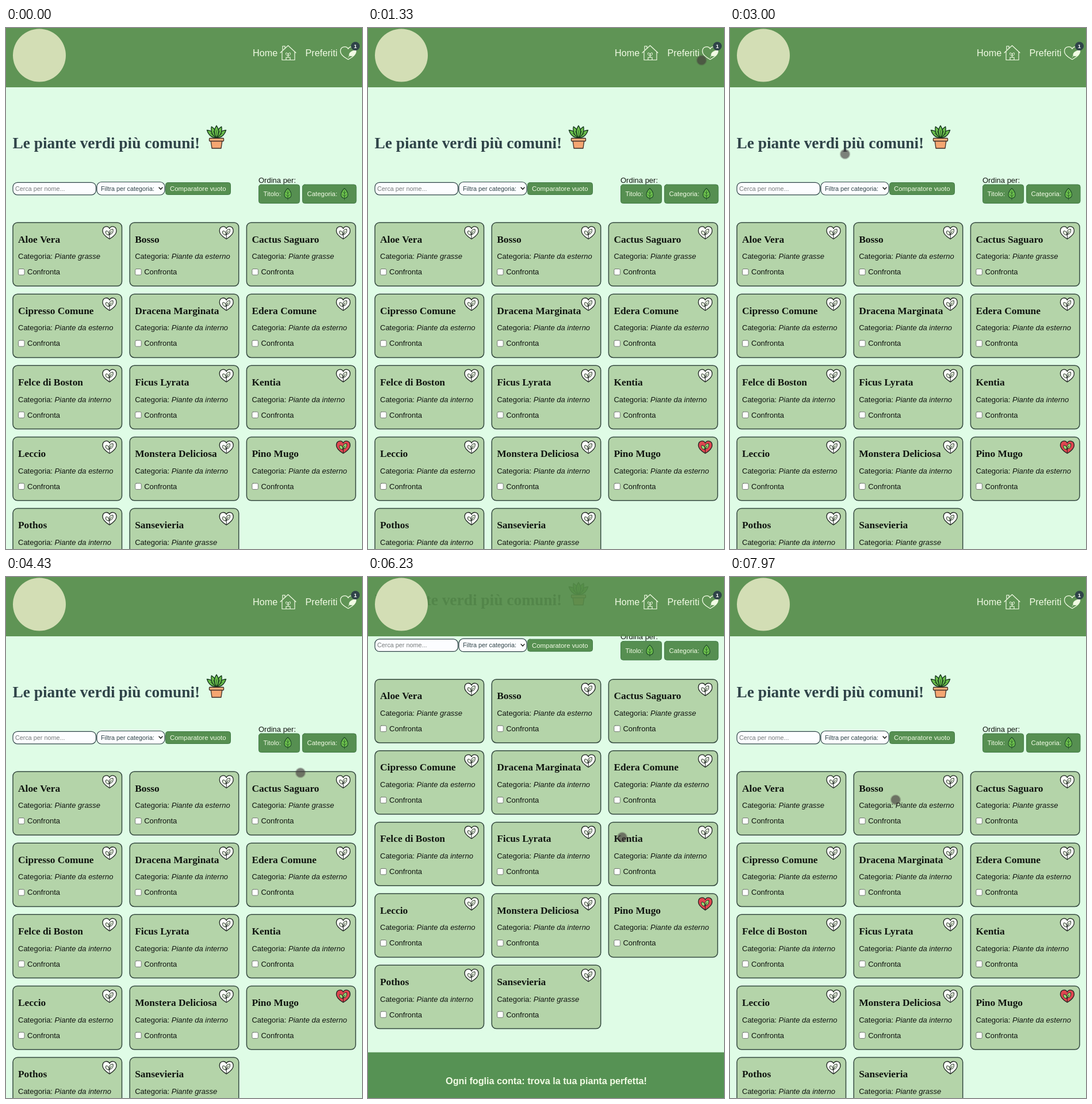
These frames come from a looping animation (619 px wide and 905 px high, 8 s). An HTML page with a canvas:

```html
<!DOCTYPE html>
<html lang="it">
<head>
<meta charset="utf-8">
<title>Le piante verdi più comuni!</title>
<style>
html, body { margin: 0; width: 100%; height: 100%; overflow: hidden; background: #dffce6; }
canvas { display: block; width: 619px; height: 905px; }
</style>
</head>
<body>
<canvas id="stage"></canvas>
<script>
const W = 619, H = 905, LOOP = 8000;
const canvas = document.getElementById('stage');
const ratio = window.devicePixelRatio || 1;
canvas.width = W * ratio;
canvas.height = H * ratio;
const ctx = canvas.getContext('2d');

const SANS = '"Liberation Sans", Arial, sans-serif';
const SERIF = '"Liberation Serif", "Noto Serif", serif';
const PAGE = '#dffce6', GREEN = '#568f51', CARD = '#b4d4a9';
const SLATE = '#2f4348', CREAM = '#f1fbe4', INK = '#101510', LEAF = '#6cc04c';

const OUT = 'Piante da esterno', IN = 'Piante da interno', FAT = 'Piante grasse';
const plants = [
  ['Aloe Vera', FAT], ['Bosso', OUT], ['Cactus Saguaro', FAT],
  ['Cipresso Comune', OUT], ['Dracena Marginata', IN], ['Edera Comune', OUT],
  ['Felce di Boston', IN], ['Ficus Lyrata', IN], ['Kentia', IN],
  ['Leccio', OUT], ['Monstera Deliciosa', IN], ['Pino Mugo', OUT, true],
  ['Pothos', IN], ['Sansevieria', FAT]
];

// Pointer keys: time, x, y
const pointerKeys = [
  [650, 636, -14], [1250, 580, 56], [1480, 580, 56], [3000, 200, 219],
  [4430, 512, 340], [5500, 442, 452], [7150, 442, 452], [7900, 288, 387]
];
const MAX_SCROLL = 178;

const clamp = v => Math.max(0, Math.min(1, v));
const easeOut = u => 1 - (1 - u) ** 3;
const easeInOut = u => u * u * (3 - 2 * u);

function text(str, x, y, size, color, style = '', family = SANS) {
  ctx.font = `${style} ${size}px ${family}`;
  ctx.fillStyle = color;
  ctx.fillText(str, x, y);
}

function box(x, y, w, h, r, fill, stroke, line = 1) {
  ctx.beginPath();
  ctx.roundRect(x, y, w, h, r);
  paint(fill, stroke, line);
}

function disc(x, y, r, fill) {
  ctx.beginPath();
  ctx.arc(x, y, r, 0, Math.PI * 2);
  paint(fill);
}

function paint(fill, stroke, line = 1) {
  if (fill) { ctx.fillStyle = fill; ctx.fill(); }
  if (stroke) { ctx.strokeStyle = stroke; ctx.lineWidth = line; ctx.stroke(); }
}

function path(d, fill, stroke, line) {
  const p = new Path2D(d);
  if (fill) { ctx.fillStyle = fill; ctx.fill(p); }
  if (stroke) { ctx.strokeStyle = stroke; ctx.lineWidth = line; ctx.stroke(p); }
}

function at(x, y, draw, angle = 0) {
  ctx.save();
  ctx.translate(x, y);
  ctx.rotate(angle);
  draw();
  ctx.restore();
}

const HEART = 'M0 11C-4 8.5-12 4-12-3C-12-12-2.5-12.5 0-7C2.5-12.5 12-12 12-3C12 4 4 8.5 0 11Z';

function favourite(x, y, on) {
  at(x, y, () => {
    path(HEART, on ? '#df4650' : '#fcfffa', '#1e2421', 1.3);
    const fill = on ? '#9bd873' : '#e3efdb';
    path('M-1 4C-8 4-7-2-6-3C-2-3 0 0-1 4Z', fill, '#1e2421', 1);
    path('M0 3C-2-4 2-6 6-6C7 0 4 3 0 3Z', fill, '#1e2421', 1);
    path('M0 10.5V3L3-2', null, '#1e2421', 1);
  });
}

function sortLeaf(x, y) {
  at(x, y, () => {
    path('M0 7.5C-8.5 6-7.5-3 0-10C7.5-3 8.5 6 0 7.5Z', LEAF, '#1d4a28', 1.1);
    path('M0 10V-6M0 4L-3.5 1M0 4L3.5 1M0-1L-2.5-3.5M0-1L2.5-3.5', null, '#1d4a28', 0.7);
  });
}

function pottedPlant() {
  const blade = 'M0 0C-4.5-6-5-14 0-21.5C5-14 4.5-6 0 0Z';
  at(366, 191, () => {
    for (const a of [-0.88, 0.88, -0.42, 0.42, 0]) {
      at(0, 0, () => {
        path(blade, LEAF, '#12331c', 1.3);
        path('M0-2V-13', null, '#12331c', 0.7);
      }, a);
    }
    path('M-10 4L-8 18H8L10 4Z', '#f5a672', '#3b2924', 1.3);
    box(-12.5, 0.5, 25, 5, 1, '#f9b27e', '#3b2924', 1.3);
  });
}

function control(x, y, w, h, label, tx, ty) {
  box(x, y, w, h, 4, GREEN, '#437b48', 1);
  text(label, tx, ty, 11.4, CREAM);
}

function toolbar() {
  box(12, 268.3, 144.5, 21.5, 8, '#fcfdff', SLATE, 1.2);
  text('Cerca per nome...', 16, 282.5, 10.8, '#777b7c');
  box(158, 267.5, 118, 22.5, 8, '#fcfdff', SLATE, 1.2);
  text('Filtra per categoria:', 165, 282.5, 10.8, SLATE);
  path('M266 277L269 280.3L272 277', null, INK, 1.4);
  control(277.5, 268.5, 113, 21, 'Comparatore vuoto', 285, 283);
  text('Ordina per:', 439, 268.5, 13, INK);
  control(439.5, 272, 71, 32.5, 'Titolo:', 447.5, 292);
  sortLeaf(490, 288.5);
  control(515.5, 272, 93.5, 32.5, 'Categoria:', 523.5, 292);
  sortLeaf(588.5, 288.5);
}

function card([name, category, liked], i) {
  at(12 + (i % 3) * 203.2, 338 + Math.floor(i / 3) * 124.15, () => {
    box(0, 0, 189.5, 110.3, 8, CARD, '#34493f', 1.5);
    text(name, 9, 34.5, 17.4, INK, 'bold', SERIF);
    text('Categoria: ', 9, 63.3, 13, INK);
    text(category, 72.6, 63.3, 13, INK, 'italic');
    box(9.5, 80.5, 10.5, 10.5, 2, '#fff', '#717a70', 1);
    text('Confronta', 25, 90.3, 13, INK);
    favourite(168, 17.5, liked);
  });
}

function page(scroll) {
  at(0, -scroll, () => {
    text('Le piante verdi più comuni!', 11.5, 209, 27.4, SLATE, 'bold', SERIF);
    pottedPlant();
    toolbar();
    plants.forEach(card);
    ctx.fillStyle = '#569254';
    ctx.fillRect(0, 986, W, 110);
    ctx.textAlign = 'center';
    text('Ogni foglia conta: trova la tua pianta perfetta!', 310, 1041.5, 16.2, CREAM, 'bold');
  });
}

function header() {
  ctx.fillStyle = 'rgba(85, 139, 73, .92)';
  ctx.fillRect(0, 0, W, 103);
  disc(58, 47.5, 46, '#d3deb5');
  text('Home', 429, 48.5, 16.2, CREAM);
  path('M477 43L490.5 30.5L504 43M480 41V55.5H502V41M481 38V31.5H485V35M487 55V51H494V55', null, CREAM, 1.2);
  path('M490.5 51V44M490.5 48C486 48 486 44 487 43C490 43 490.5 46 490.5 48C495 48 495 44 494 43C491 43 490.5 46 490.5 48', null, CREAM, 1);
  text('Preferiti', 520.5, 48.5, 16.2, CREAM);
  at(595, 43.5, () => {
    ctx.scale(1.13, 1.02);
    path(HEART, null, CREAM, 1.2);
  });
  path('M597 48C595.5 42 602 40 608 38C609 46 604 50.5 597 48ZM595 51L598 47', CREAM, CREAM, 0.8);
  disc(607.5, 31.5, 7.6, SLATE);
  ctx.textAlign = 'center';
  text('1', 607.5, 35, 9.5, '#fff', 'bold');
  ctx.textAlign = 'left';
}

function scrollAt(t) {
  const down = easeOut(clamp((t - 6000) / 430));
  const up = easeOut(clamp((t - 6630) / 430));
  return MAX_SCROLL * (down - up);
}

function pointer(t) {
  if (t < pointerKeys[0][0]) return;
  const next = pointerKeys.findIndex(k => k[0] > t);
  const b = pointerKeys[next < 0 ? pointerKeys.length - 1 : next];
  const a = next < 0 ? b : pointerKeys[next - 1];
  const u = a === b ? 0 : easeInOut((t - a[0]) / (b[0] - a[0]));
  const x = a[1] + (b[1] - a[1]) * u;
  const y = a[2] + (b[2] - a[2]) * u;
  disc(x, y, 9.3, 'rgba(70, 65, 65, .25)');
  disc(x, y, 7.8, 'rgba(64, 54, 55, .5)');
}

function draw(t) {
  ctx.setTransform(ratio, 0, 0, ratio, 0, 0);
  ctx.lineJoin = ctx.lineCap = 'round';
  ctx.fillStyle = PAGE;
  ctx.fillRect(0, 0, W, H);
  page(scrollAt(t));
  header();
  pointer(t);
}

const start = performance.now();
function tick() {
  draw((performance.now() - start) % LOOP);
  requestAnimationFrame(tick);
}
tick();
</script>
</body>
</html>
```
